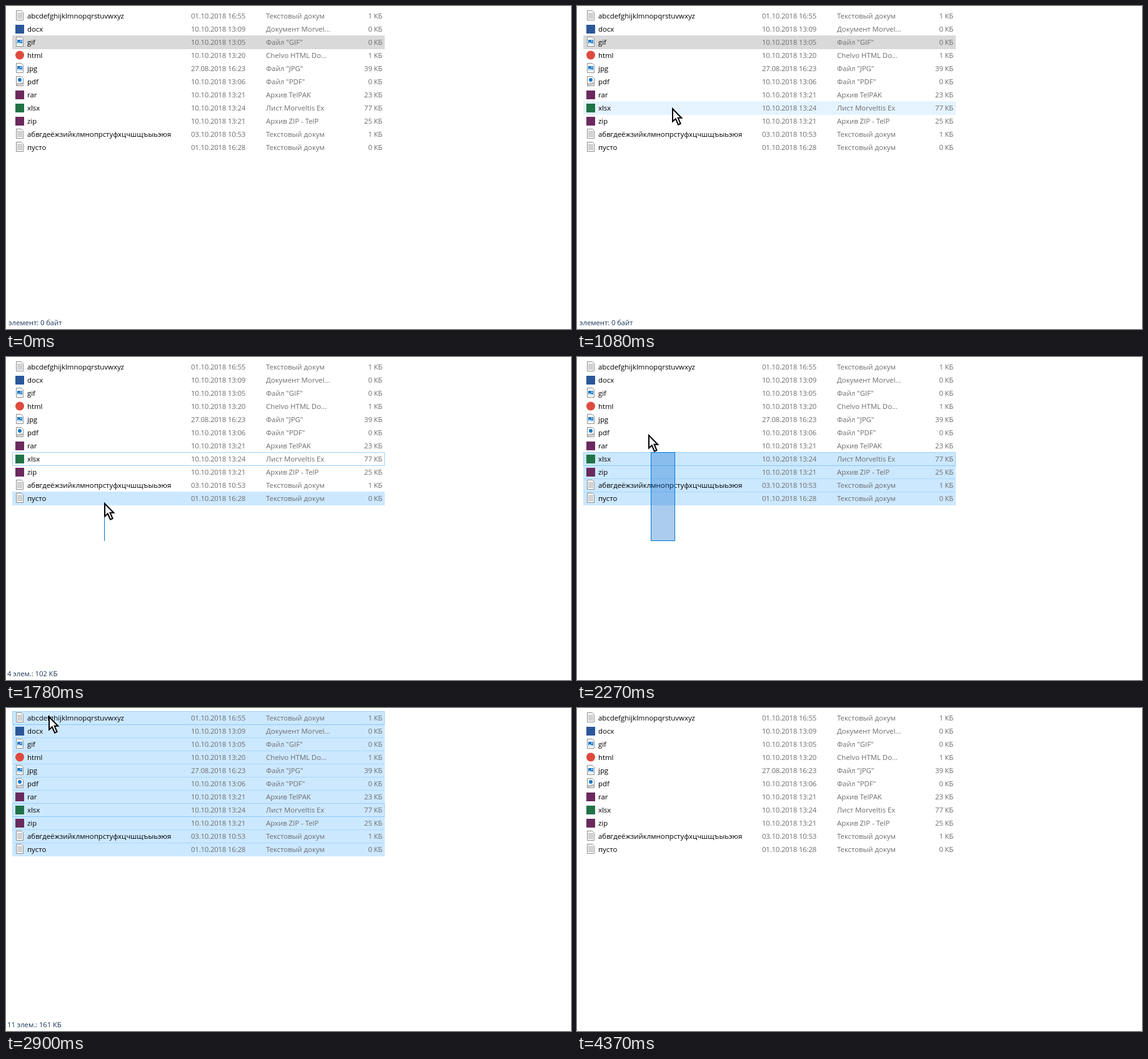
Animation, 904 px wide and 516 px high, one loop 5210 ms. Source, as an HTML page:

```html
<!DOCTYPE html>
<html lang="ru">
<head>
<meta charset="utf-8">
<title>Список файлов</title>
<style>
html, body { margin: 0; width: 100%; height: 100%; overflow: hidden; background: #fff; }
svg { display: block; width: 904px; height: 516px; }
text { font: 11.4px "Open Sans", "Noto Sans", sans-serif; white-space: pre; }
.info { fill: #6d6d6d; }
.num { letter-spacing: -.2px; }
</style>
</head>
<body>
<svg viewBox="0 0 904 516" xmlns="http://www.w3.org/2000/svg">
  <g id="back"></g>
  <g id="list"></g>
  <text id="status" y="510" fill="#1e395b" letter-spacing="-.1"></text>
  <rect id="band" fill="#06c" fill-opacity=".33" stroke="#0078d7"/>
  <path id="arrow" d="M1 2.2V22.6L5.8 18.2L10 27.6L13.6 26L9.6 16.8H15.2Z" fill="#fff" stroke="#000" stroke-width="2"/>
</svg>
<script>
const LOOP = 5210, STEP = 70, ROW = 21, TOP = 5, MARKED = 2, FOCUS = 7;
const T = { show: 100, hover: 940, drag: 1430, drop: 1640, again: 1710, blank: 2130,
  stall: 2270, resume: 2480, count: 2620, release: 2830, clear: 3320, leave: 4160, blur: 4370 };
const $ = id => document.getElementById(id);

const files = [
  ['text', 'abcdefghijklmnopqrstuvwxyz', '01.10.2018 16:55', 'Текстовый докум', 1],
  ['word', 'docx', '10.10.2018 13:09', 'Документ Morvel...', 0],
  ['image', 'gif', '10.10.2018 13:05', 'Файл "GIF"', 0],
  ['web', 'html', '10.10.2018 13:20', 'Chelvo HTML Do...', 1],
  ['image', 'jpg', '27.08.2018 16:23', 'Файл "JPG"', 39],
  ['pdf', 'pdf', '10.10.2018 13:06', 'Файл "PDF"', 0],
  ['pack', 'rar', '10.10.2018 13:21', 'Архив TelPAK', 23],
  ['sheet', 'xlsx', '10.10.2018 13:24', 'Лист Morveltis Ex', 77],
  ['pack', 'zip', '10.10.2018 13:21', 'Архив ZIP - TelP', 25],
  ['text', 'абвгдеёжзийклмнопрстуфхцчшщъыьэюя', '03.10.2018 10:53', 'Текстовый докум', 1],
  ['text', 'пусто', '01.10.2018 16:28', 'Текстовый докум', 0]
];

const page = '<path d="M2.5 -.5H10.5L13.5 2.5V14.5H2.5Z" fill="#fff" stroke="#8c8c8c"/>';
const square = color => `<rect x="1" y="1" width="14" height="14" fill="${color}"/>`;
const icons = {
  text: page + '<path d="M4 3.5H12M4 5.5H12M4 7.5H12M4 9.5H12M4 11.5H12" stroke="#a6a6a6"/>',
  image: page + '<rect x="4" y="4" width="8" height="8" fill="#1979ca"/>' +
    '<path d="M4 12V10L6.5 7.5L8.5 9.5L10 8.5L12 10.5V12Z" fill="#d5ebfb"/><circle cx="9.8" cy="6" r="1" fill="#fff"/>',
  pdf: page + '<circle cx="8" cy="5" r="3" fill="#1979ca"/>' +
    '<text x="8" y="13" text-anchor="middle" fill="#444" style="font-size:6px">pdf</text>',
  word: square('#2b579a'),
  sheet: square('#217346'),
  pack: square('#6b2a5e'),
  web: '<circle cx="8" cy="7.5" r="7" fill="#dd4b3e"/>'
};

$('list').innerHTML = files.map(([icon, name, date, kind, size], i) => `
  <g transform="translate(0 ${ROW * i})">
    <g transform="translate(14 8)">${icons[icon]}</g>
    <text x="34" y="20">${name}</text>
    <text x="296" y="20" class="info num">${date}</text>
    <text x="416" y="20" class="info">${kind}</text>
    <text x="602" y="20" class="info num" text-anchor="end">${size} КБ</text>
  </g>`).join('');

// Pointer strokes: start time, number of steps, end point
const strokes = [
  [T.show, 1, 769, 142], [520, 3, 241, 275], [870, 1, 225, 248], [T.hover, 3, 152, 162],
  [T.drag, 1, 152, 212], [1500, 2, 157, 294], [1780, 2, 156, 170], [1990, 4, 118, 152],
  [T.stall, 1, 114, 123], [T.resume, 3, 68, 12], [3110, 5, 260, 387],
  [3600, 1, 250, 374], [3810, 5, 850, 43]
];

function pointerAt(t) {
  let [, , x, y] = strokes[0];
  for (const [start, steps, endX, endY] of strokes) {
    if (t < start) break;
    const k = Math.min(1, (Math.floor((t - start) / STEP) + 1) / steps);
    x += (endX - x) * k;
    y += (endY - y) * k;
  }
  return [Math.round(x), Math.round(y)];
}

const during = (t, from, to) => t >= from && t < to;
const set = (id, attrs) => { for (const k in attrs) $(id).setAttribute(k, attrs[k]); };
const visibility = on => on ? 'visible' : 'hidden';

// The band spans from the press point to the pointer, one step late while it stalls
function bandAt(t) {
  const [ax, ay] = pointerAt(t < T.again ? T.drag - 1 : T.again);
  const [x, y] = pointerAt(during(t, T.stall, T.resume) ? T.stall - 1 : Math.min(t, T.release));
  return { x: Math.min(ax, x), y: Math.min(ay, y), w: Math.abs(x - ax), h: Math.abs(y - ay) };
}

const fillRow = (i, color) =>
  `<rect x="10" y="${TOP + ROW * i}" width="596" height="${ROW + 1}" fill="${color}"/>`;
const frameRow = i =>
  `<rect x="10.5" y="${TOP + ROW * i + .5}" width="595" height="${ROW}" fill="none" stroke="#99d1ff"/>`;

// Selected rows are translucent and overlap by a pixel, which gives the lines between them
function rowsAt(t, band, [px, py]) {
  const free = during(t, T.hover, T.drag) || during(t, T.release, T.leave);
  const over = free && px >= 10 && px < 606 ? Math.floor((py - TOP) / ROW) : -1;
  return files.map((_, i) => {
    const y = TOP + ROW * i;
    const chosen = during(t, T.drag, T.clear) && y < band.y + band.h && y + ROW > band.y;
    const focused = i === FOCUS && during(t, T.drag, T.blur);
    let row = '';
    if (i === MARKED && t < T.drag) row += fillRow(i, '#d9d9d9');
    else if (chosen) row += fillRow(i, 'rgba(90,181,255,.31)');
    else if (i === over) row += fillRow(i, '#e5f3ff');
    if (focused || chosen && i === over) row += frameRow(i);
    return row;
  }).join('');
}

function statusAt(t) {
  if (t < T.drop) return [4, 'элемент: 0 байт'];
  if (t < T.blank) return [2, '4 элем.: 102 КБ'];
  return [2, during(t, T.count, T.clear) ? '11 элем.: 161 КБ' : ''];
}

function draw(t) {
  const point = pointerAt(t), band = bandAt(t), [x, label] = statusAt(t);
  const dragging = during(t, T.drag, T.drop) || during(t, T.again + STEP, T.release);

  $('back').innerHTML = rowsAt(t, band, point);
  $('status').textContent = label;
  set('status', { x });
  set('band', {
    x: band.x + .5, y: band.y + .5,
    width: Math.max(.01, band.w - 1), height: Math.max(.01, band.h - 1),
    visibility: visibility(dragging)
  });
  set('arrow', {
    transform: `translate(${point})`,
    visibility: visibility(during(t, T.show, T.leave))
  });
}

function tick() {
  draw(performance.now() % LOOP);
  requestAnimationFrame(tick);
}
tick();
</script>
</body>
</html>
```
